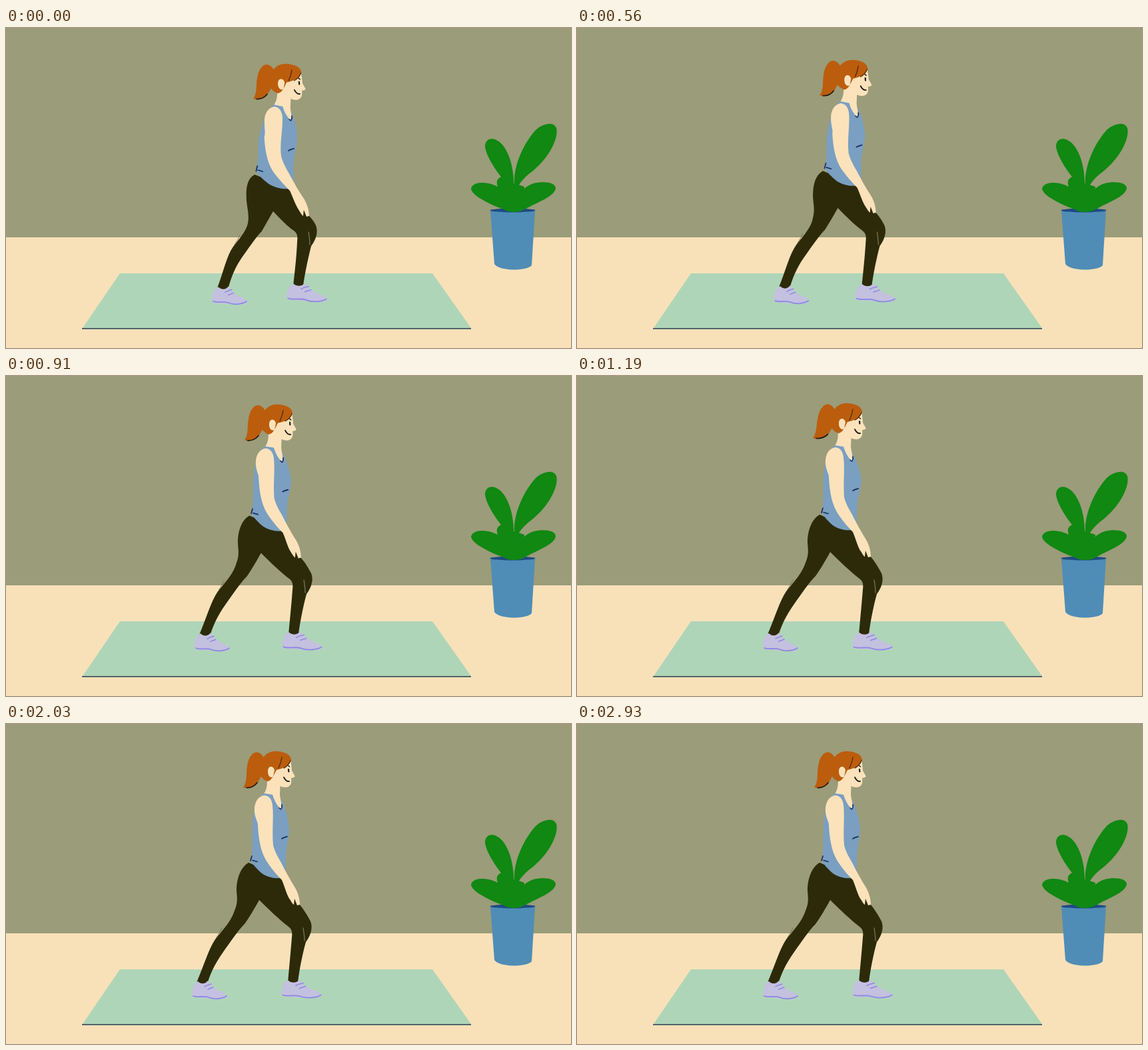
Animation of 848 by 480 pixels, one loop 3 s. Source, as an HTML page:

```html
<!DOCTYPE html>
<html lang="en">
<head>
<meta charset="utf-8">
<title>Lunge on a mat</title>
<style>
html, body { margin: 0; width: 100%; height: 100%; overflow: hidden; background: #9b9c79; }
svg { display: block; width: 100%; height: 100%; }
</style>
</head>
<body>
<svg viewBox="0 0 848 480">
  <rect width="848" height="480" fill="#9b9c79"/>
  <rect y="314" width="848" height="166" fill="#f8e1b9"/>
  <path d="M171,368 H640 L698,450 H115Z" fill="#afd5b8"/>
  <path d="M114,450.8 H698" stroke="#3d5560" stroke-width="1.7"/>
  <g id="plant">
    <path fill="#4f8db6" d="M727,274 L733,354 C740,365 782,365 789,356 L794,274Z"/>
    <ellipse cx="760.5" cy="273.5" rx="34" ry="3" fill="#1f4b80"/>
    <g fill="#108812">
      <path d="M759,238 C744,230 718,190 719,176 C721,164 733,163 744,174 C757,188 763,215 762,240Z"/>
      <path d="M763,235 C761,210 775,175 795,153 C806,143 822,140 826,150 C830,165 815,195 790,215 C775,226 768,236 766,245Z"/>
      <path d="M752,274 C735,268 700,254 698,241 C700,230 722,229 738,238 C750,240 763,260 763,276Z"/>
      <path d="M762,276 C764,255 775,238 792,233 C808,229 826,232 825,241 C822,254 795,262 775,274Z"/>
      <path d="M738,238 C734,228 740,224 746,222 L759,232 L766,234 L778,238 L775,274 Q762,278 750,274Z"/>
    </g>
  </g>
  <g id="woman" stroke-linecap="round" stroke-linejoin="round"></g>
</svg>
<script>
const LOOP = 3000, STEP = 70, MOVE = 1190;
const SKIN = '#fbe2bb', HAIR = '#bb5d0d', PANTS = '#2d2a0a', SHIRT = '#7a9fc1',
      SHOE = '#c4c0df', SOLE = '#8d88e4', INK = '#1d1a18', NAVY = '#1b2f5c';

// Stepped-back pose: [x, y, dx, dy], where dx, dy lead to the starting pose.
const chest = [425, 155, 10, 10], ponytailTip = [358, 96, 15, 11];
const anchors = [
  chest, ponytailTip,
  [433, 78, 16, 13], [405, 41, 15, 13], [410, 95, 16, 13], [385, 60, 15, 12.5],
  [387, 104, 15, 11], [413, 128, 15, 11], [373, 130, 15, 11],
  [418, 170, 10, 12], [371, 160, 9, 11], [371, 204, 8, 8.5], [402, 185, 12, 10],
  [414, 230, 12, 10], [438, 270, 14, 11], [363, 208, 9, 12], [346, 250, 15, 9],
  [380, 264, 21, 11], [320, 318, 27, 5], [350, 308, 26, 5],
  [295, 388, 31, 2.5], [280, 405, 30, 2], [331, 408, 30, 2],
  [458, 300, 8, 0], [428, 310, 8, 0], [447, 318, 8, 0],
  [430, 388, 8, -1], [413, 400, 8, -1], [473, 407, 8, 0]
];

const mapPoints = (d, fn) =>
  d.replace(/([\d.]+),([\d.]+)/g, (_, x, y) => fn(+x, +y).map(v => v.toFixed(2)).join(','));

const shoe = 'M279,406 C279,398 282,388 288,386 C293,391 299,390 303,385 C307,392 314,398 322,401 C329,404 332,406 331,410 C328,414 312,413 300,411 C290,411 280,412 279,406Z';
const sole = 'M281,408 C288,411 297,407 304,410 C313,414 325,412 331,408';
const laces = 'M298,394 C302,391 305,391 308,390 M303,398 L311,395';
const toFront = d => mapPoints(d, (x, y) => [413 + (x - 279) * 1.15, y - 1.5]);

const parts = [];
const woman = document.getElementById('woman');
function add(d, fill, stroke, width) {
  const el = document.createElementNS('http://www.w3.org/2000/svg', 'path');
  el.setAttribute('fill', fill);
  if (stroke) {
    el.setAttribute('stroke', stroke);
    el.setAttribute('stroke-width', width);
  }
  woman.append(el);
  parts.push({ el, d });
}
const shape = (d, fill) => add(d, fill);
const line = (d, color, width = 1.6) => add(d, 'none', color, width);

// Legs
shape('M364,208 C352,215 346,232 346,250 C347,262 348,268 343,280 C338,296 326,308 314,323 C304,338 297,362 286,388 C291,394 298,393 302,390 C306,376 313,360 326,342 C336,328 348,310 358,300 C364,292 374,275 380,264 L414,230Z', PANTS);
shape('M364,208 L380,264 C392,276 412,295 424,304 C429,308 430,312 429,320 C427,345 425,365 423,388 C428,391 434,391 438,388 C440,370 445,345 450,327 C457,318 461,306 457,296 C451,284 444,274 437,267 C428,256 420,243 415,231Z', PANTS);
line('M324,306 C322,311 319,316 316,320', '#77755c', 1);
line('M446,306 C447,312 448,318 448,325', '#77755c', 1.3);
for (const place of [d => d, toFront]) {
  shape(place(shoe), SHOE);
  line(place(sole), SOLE, 1.8);
  line(place(laces), SOLE, 1.5);
}

// Head and neck
shape('M388,52 C383,42 375,39 369,46 C363,52 362,62 361,72 C361,82 360,90 356,95 C366,98 376,94 380,84 C386,74 389,62 388,52Z', HAIR);
line('M361,95.5 C368,96 374,92 377,88', INK, 1.7);
shape('M400,50 L427,53 C428,60 429,66 429,70 L433.5,78 C434,80 430,81 428,81 C429,88 428,94 420,95 C416,95 413,94 411.5,93 L411,106 C412,114 415,122 413,129 L398,120 L386,106 C390,101 392,95 392,84Z', SKIN);
shape('M383,56 C388,44 398,40 408,41 C418,42 427,45 428,54 C425,62 416,67 406,69 C403,74 400,84 393,86 C385,84 378,76 380,62Z', HAIR);
shape('M403,69 C401,62 393,62 393,71 C393,78 397,82 401,79Z', SKIN);
line('M414,50 C413,57 411,62 409,66', '#5d2c08', 1.4);
line('M427,55 C425,60 421,64 417,66', '#5d2c08', 1.4);
line('M423.5,62.5 L425.5,64', INK, 1.5);
line('M424,68 L424.3,71.5', INK, 2.2);
line('M417,80 C419,84 422,86.5 425,86', INK, 1.9);

// Top and arm
shape('M387,104 L400,106 C403,116 408,124 413,128 C415,122 413,114 411,110 C418,122 424,140 425,158 C425,172 420,185 420,202 C420,215 420,225 418,230 C408,233 394,231 384,224 C376,217 371,211 367,205 C371,190 369,170 370,155 C371,130 376,112 387,104Z', SHIRT);
line('M410,126 L412.5,128 C414,126 414.5,123 414,121', NAVY);
shape('M387,107 C378,109 372,118 373,132 C374,142 378,146 378,152 C379,172 382,190 390,204 C396,214 406,226 414,234 C418,243 420,252 424,260 C428,266 430,270 432,271 L433,262 L437,272 L441,271 C441,262 438,252 433,244 C428,236 420,222 413,208 C407,198 403,190 401,182 C399,160 402,140 400,122 C399,112 394,107 387,107Z', SKIN);
line('M414,172 C417,170 420,169.5 422,169', NAVY, 1.8);
line('M369,198 L367,205 M370,204.5 L377,206.5', NAVY, 1.7);

// Inverse-distance blend of the anchors' offsets
function warp(x, y, offsets) {
  let sum = 0, dx = 0, dy = 0;
  anchors.forEach(([ax, ay], i) => {
    const w = 1 / ((x - ax) ** 2 + (y - ay) ** 2 + 4) ** 1.7;
    sum += w;
    dx += w * offsets[i][0];
    dy += w * offsets[i][1];
  });
  return [x + dx / sum, y + dy / sum];
}

const clamp01 = v => Math.min(1, Math.max(0, v));

function render(time) {
  const t = Math.floor(time / STEP) * STEP;
  const left = (1 + Math.cos(Math.PI * clamp01(t / MOVE))) / 2;
  const swing = Math.exp(-(((t - MOVE) / 180) ** 2));
  const settle = 2 * clamp01((2030 - t) / 840);
  const offsets = anchors.map(a => {
    const extraX = a === chest ? settle : a === ponytailTip ? -2 * swing : 0;
    const extraY = a === ponytailTip ? -2 * swing : 0;
    return [a[2] * left + extraX, a[3] * left + extraY];
  });
  for (const { el, d } of parts) {
    el.setAttribute('d', mapPoints(d, (x, y) => warp(x, y, offsets)));
  }
}

const start = performance.now();
function tick() {
  render((performance.now() - start) % LOOP);
  requestAnimationFrame(tick);
}
tick();
</script>
</body>
</html>
```
